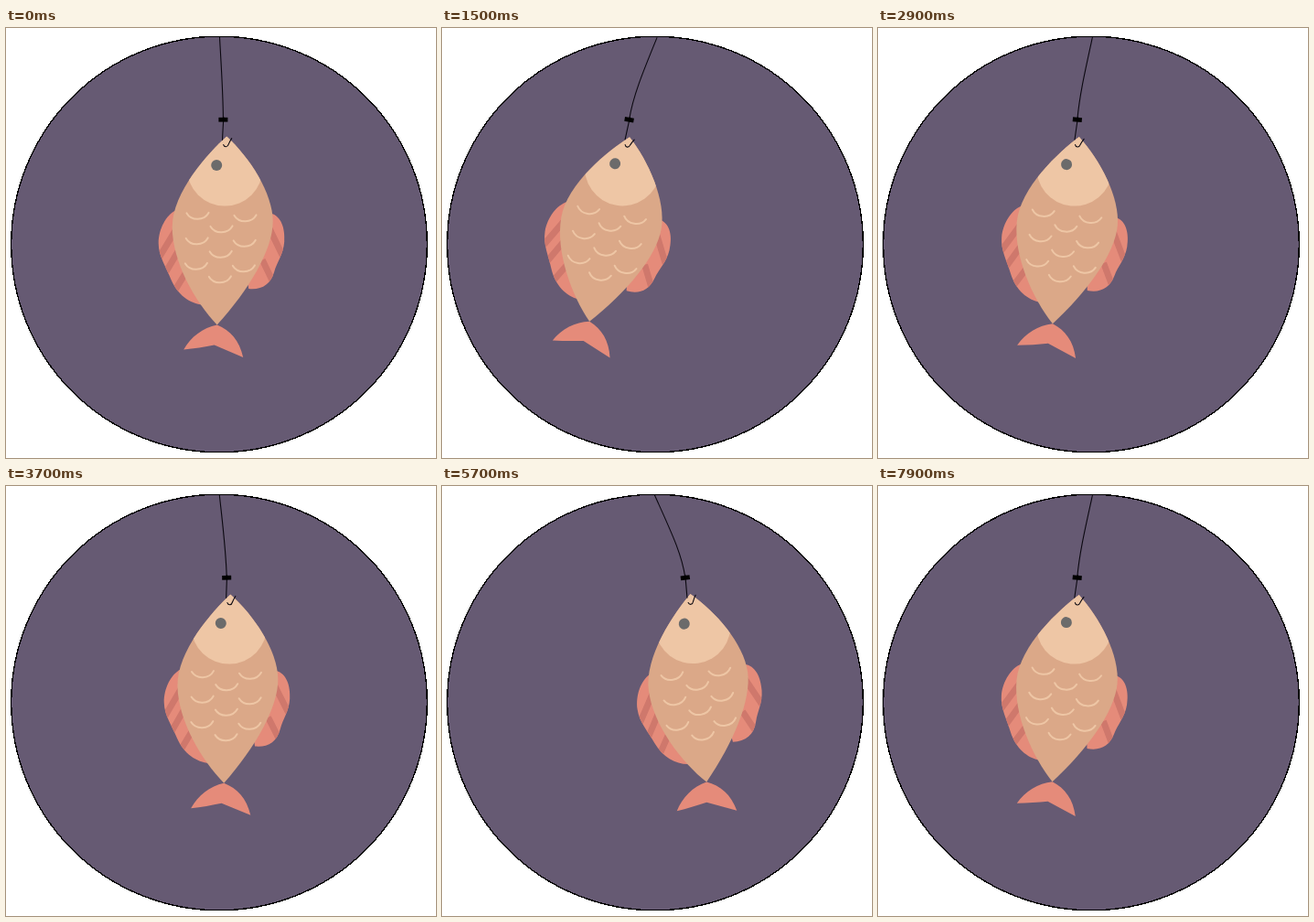
An HTML page for the animation above (8000 ms loop, 470x470 px).

```html
<!DOCTYPE html>
<html lang="en">
<head>
<meta charset="utf-8">
<title>Fish on a line</title>
<style>
  html, body { margin: 0; width: 100%; height: 100%; overflow: hidden; background: #fff; }
  svg { display: block; width: 100vw; height: 100vh; }
  .line { fill: none; stroke: #0b0810; stroke-width: 1.1; stroke-linecap: round; }
  .fin { fill: #e58b7a; }
  .stripes { fill: none; stroke: #cf786c; stroke-width: 7; }
  .light { fill: #eec6a5; }
  .scales { fill: none; stroke: #eec6a5; stroke-width: 2; stroke-linecap: round; }
</style>
</head>
<body>
<svg viewBox="0 0 470 470">
  <defs>
    <path id="body" d="M242 119C222 137 182.500 180 182.500 218S207.500 300 231.500 325C266 287 292.500 243 292.500 212S267 142 242 119z"/>
    <path id="finL" d="M186 200C176 205 167.500 220 167.500 236C167.500 250 176 262 181 275C188 292 202 302 216 303L235 260 200 200z"/>
    <path id="finR" d="M290 203C302 206 306 220 305 234C304 248 297 256 294 267C290 281 280 287 266 285.500L260 240z"/>
    <path id="scale" d="M-12 0C-7 8.500 7 8.500 12-.5"/>
    <clipPath id="inBody"><use href="#body"/></clipPath>
    <clipPath id="inFins"><use href="#finL"/><use href="#finR"/></clipPath>
  </defs>

  <circle cx="233" cy="236.500" r="227.300" fill="#665a73" stroke="#000" stroke-width="1.4" shape-rendering="crispEdges"/>

  <g id="fish">
    <path class="fin" d="M231.500 325C216 328 203 338 195 352C206 351 218 349 228.500 347L260 360.500C256 342 246 331 231.500 325z"/>
    <use class="fin" href="#finL"/>
    <use class="fin" href="#finR"/>
    <path class="stripes" clip-path="url(#inFins)" d="M187 220L167 253M191 241L172 273M201 262L183 291M287 216L303 249M281 254L295 283"/>
    <use href="#body" fill="#dba888"/>
    <circle class="light" cx="240" cy="153.600" r="41.400" clip-path="url(#inBody)"/>
    <g class="scales" id="scales"></g>
    <circle cx="231" cy="150.300" r="6" fill="#6b6b6b"/>
    <path class="line" d="M238.500 128C239.500 131 243 131 244 127.500Q245.500 124 247.500 121"/>
  </g>

  <path id="string" class="line"/>
  <g id="bead">
    <path class="line" d="M.4-3L-.9 22"/>
    <rect x="-5" y="-2.4" width="10" height="4.800"/>
  </g>
</svg>
<script>
  const LOOP = 8000, STEP = 100;
  const RISE = 3000, FALL = 4000, TURN = 2040;
  const MOUTH = { x: 242, y: 119 };
  const $ = id => document.getElementById(id);

  const scaleAt = (x, y) => `<use href="#scale" x="${x}" y="${y}"/>`;
  $('scales').innerHTML = [0, 1, 2].map(row => {
    const y = 202.8 + 27.5 * row, x = 210.3 - row * 0.8;
    return scaleAt(x, y) + scaleAt(x + 26, y + 14.5) + scaleAt(x + 52, y + 2.5);
  }).join('');

  // Swing from 0 (far left) to 1 (far right), faster to the right.
  function swing(t) {
    const s = (t - TURN + RISE + FALL) % (RISE + FALL);
    return s < RISE ? s / RISE : 1 - (s - RISE) / FALL;
  }

  function draw(t) {
    const d = swing(t) - 0.51;
    const angle = -(22 * d + 21 * d ** 3);
    const rad = angle * Math.PI / 180;

    const mouthX = 241.2 + 94.5 * d - 5 * d * d, mouthY = 118.6 - 1.5 * d;
    $('fish').setAttribute('transform',
      `translate(${mouthX} ${mouthY}) rotate(${angle}) translate(${-MOUTH.x} ${-MOUTH.y})`);

    const beadX = 237.4 + 87.5 * d, beadY = 100.2;
    $('bead').setAttribute('transform', `translate(${beadX} ${beadY}) rotate(${angle})`);

    const topX = 233.5 - 3.6 * d, topY = 10.3 - 1.5 * d;
    const bendX = topX + 0.7 * (236.7 + 66 * d - topX);
    const pullX = beadX + 26 * Math.sin(rad), pullY = beadY - 26 * Math.cos(rad);
    $('string').setAttribute('d',
      `M${topX} ${topY}C${bendX} 50 ${pullX} ${pullY} ${beadX} ${beadY}`);
  }

  const start = performance.now();
  function tick() {
    const t = (performance.now() - start) % LOOP;
    draw(Math.floor(t / STEP) * STEP);
    requestAnimationFrame(tick);
  }
  tick();
</script>
</body>
</html>
```
